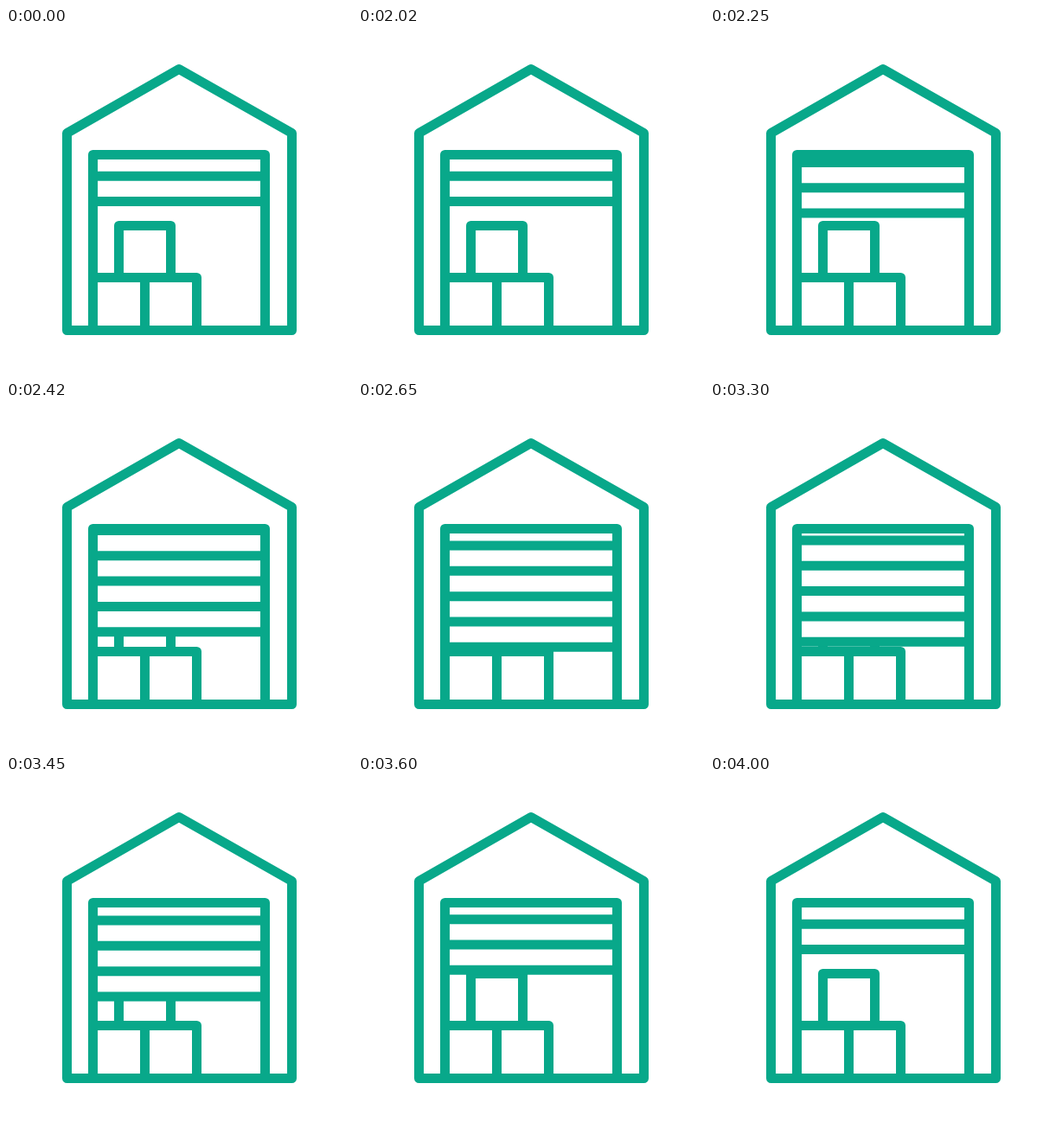
Recreate the animation shown at these times as an HTML page. Size 400 by 400 pixels, loop 4020 ms.

```html
<!DOCTYPE html>
<html lang="en">
<head>
<meta charset="utf-8">
<title>Warehouse door</title>
<style>
  html, body { margin: 0; width: 100%; height: 100%; overflow: hidden; background: #fff; }
  svg { display: block; width: 100vw; height: 100vh; }
  path { fill: none; stroke: #08a88a; stroke-width: 11; stroke-linecap: round; stroke-linejoin: round; }
</style>
</head>
<body>
<svg viewBox="0 0 400 400">
  <path d="M130.5 288.5V228.5H190.5V288.5M100.5 288.5H220.5V349.5M160.5 288.5V349.5"/>
  <rect id="door" x="101" y="147" width="198" fill="#fff"/>
  <path id="slats"/>
  <path d="M100.5 349.5V146.5H299.5V349.5"/>
  <path d="M70.5 349.5V121.5L200 47.5L330.5 121.5V349.5Z"/>
</svg>
<script>
const LOOP = 4020, OPEN = 200.5, SHUT = 288.5, GAP = 29.33;
const door = document.getElementById('door');
const slats = document.getElementById('slats');

// Cubic bezier easing with control points (a, 0) and (b, 1)
function ease(x, a, b) {
  if (x <= 0) return 0;
  if (x >= 1) return 1;
  let lo = 0, hi = 1, s;
  for (let i = 0; i < 24; i++) {
    s = (lo + hi) / 2;
    const r = 1 - s;
    if (3 * a * s * r * r + 3 * b * s * s * r + s * s * s < x) lo = s;
    else hi = s;
  }
  return s * s * (3 - 2 * s);
}

function draw(t) {
  const rising = t >= 3000;
  const closed = rising
    ? 1 - ease((t - 3000) / 1000, 0.6, 0.4)
    : ease((t - 2000) / 1000, 0.56, 0);
  const bottom = OPEN + (SHUT - OPEN) * closed;
  // The first slat to leave slides slightly past the lintel
  const top = rising && bottom > 230 ? 142 : 147;
  let d = '';
  for (let y = bottom; y >= top; y -= GAP) d += `M100.5 ${y}H299.5`;
  slats.setAttribute('d', d);
  door.setAttribute('height', bottom - 147);
}

const start = performance.now();
function tick() {
  draw((performance.now() - start) % LOOP);
  requestAnimationFrame(tick);
}
tick();
</script>
</body>
</html>
```
